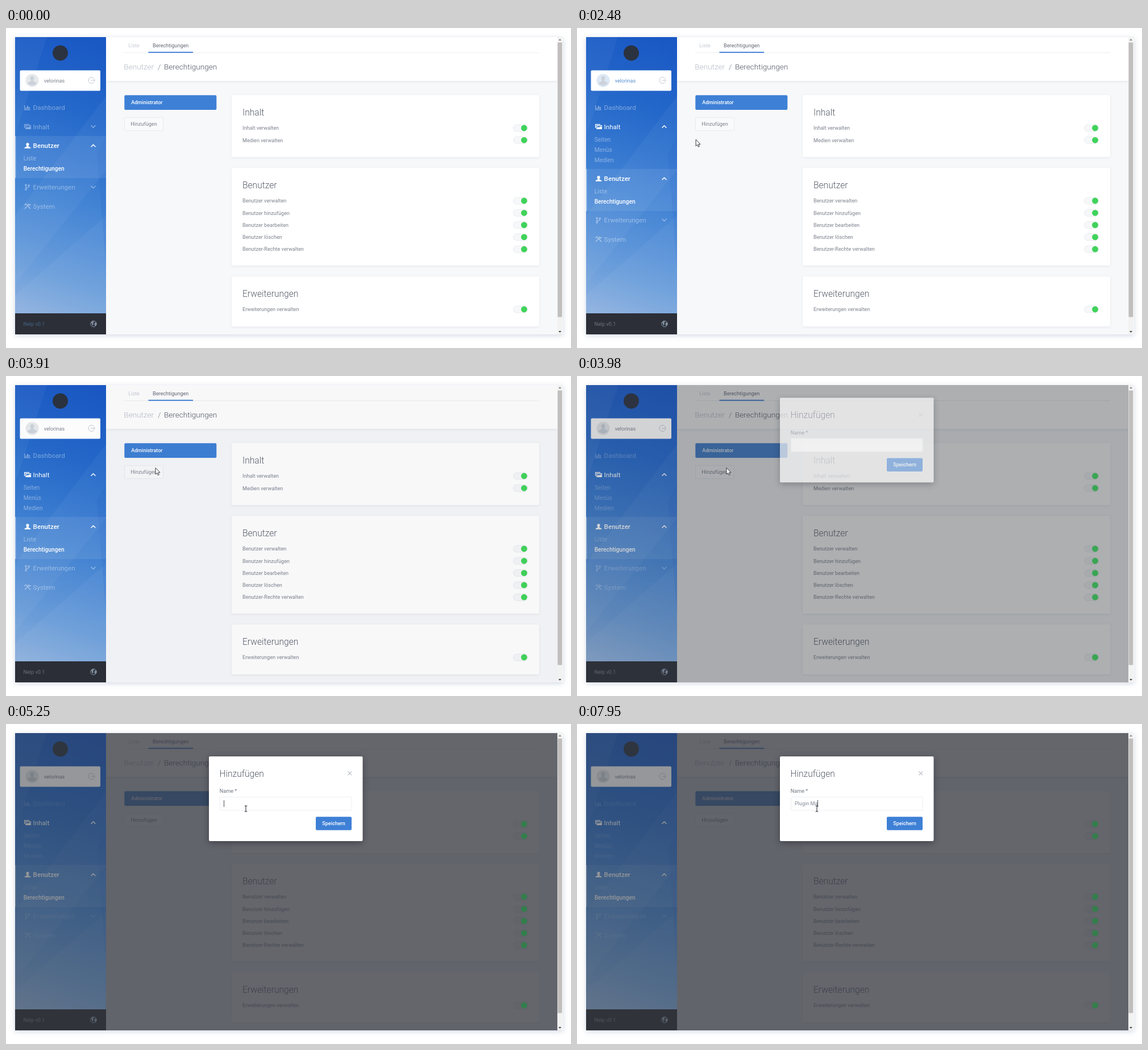
An HTML page that plays this animation: 994x563 px, repeating every 8000 ms.

```html
<!DOCTYPE html>
<html lang="de">
<head>
<meta charset="utf-8">
<title>Berechtigungen</title>
<style>
  html, body { margin: 0; width: 100%; height: 100%; overflow: hidden; background: #fff; }
  svg { display: block; width: 994px; height: 563px; }
  text { font-family: Roboto, "Open Sans", sans-serif; white-space: pre; }
  .light { font-weight: 300; }
  .mid { font-weight: 500; }
  .card { fill: #fff; filter: drop-shadow(0 1px 2px rgba(40, 50, 80, .09)); }
  .line { fill: none; stroke-linecap: round; stroke-linejoin: round; }
</style>
</head>
<body>
<svg id="stage" viewBox="0 0 994 563" xmlns="http://www.w3.org/2000/svg"></svg>
<script>
const LOOP = 8000;
const BLUE = '#3e80d6', GREY = '#7c828d', HEAD = '#565c69';
const stage = document.getElementById('stage');

// Text placed by its left edge and the middle of its capitals
const text = (x, cy, s, size, fill, extra = '') =>
  `<text x="${x}" y="${(cy + size * .355).toFixed(2)}" font-size="${size}" fill="${fill}" ${extra}>${s}</text>`;
const rect = (x, y, w, h, fill, extra = '') =>
  `<rect x="${x}" y="${y}" width="${w}" height="${h}" fill="${fill}" ${extra}/>`;
const light = 'class="light"', mid = 'class="mid"', muted = 'class="muted"';

const icons = {
  chart: '<path d="M0-4v8.5h11v-1.3H1.3V-4zM2.3 0h2v2.5h-2zM5-3h2v5.500H5zM7.800-1h2v3.500h-2z"/>',
  images: '<path fill-rule="evenodd" d="M0-4.500h9v1.300H1.300V2.500H0zM2.300-2.500H12V4.500H2.300zM3.500-1.300V2.500L5.500.300 7 1.800 9-.700 10.800 1.500V-1.300z"/>',
  person: '<path d="M6-5c-3.400 0-3 4.500-1.300 5.700C4.700 2 .500 2 .300 4.800H11.700C11.500 2 7.300 2 7.300.700 9-.500 9.400-5 6-5z"/>',
  branch: '<g class="line" stroke="#fff" stroke-width="1.300"><path d="M3-2.500V3M3 1.500C7.500 1 8.200 0 8.200-1.500"/><circle cx="3" cy="-3.500" r="1.200"/><circle cx="3" cy="4" r="1.200"/><circle cx="8.200" cy="-2.800" r="1.200"/></g>',
  tools: '<g class="line" stroke="#fff" stroke-width="1.700"><path d="M1.500 4L8-3M1-2.500L3.200-4.200 5-2.200 10.500 4M7.500-3.800l1.500 2 2-1"/></g>'
};
const item = (id, icon, label, cy, arrow, on) => `
  <g id="${id}" ${on ? '' : muted} fill="#fff">
    <g transform="translate(32 ${cy})">${icons[icon]}</g>
    ${text(47.6, cy, label, 11.6, '#fff', on ? mid : '')}
    ${arrow ? `<path ${arrow === 'id' ? 'id="chevron"' : ''} class="line" stroke="#fff" stroke-width="1.500"
      d="${arrow === 'up' ? `M150 ${cy + 1.7}l3.500-3.500 3.500 3.500` : `M150 ${cy - 1.7}l3.500 3.500 3.500-3.500`}"/>` : ''}
  </g>`;

const toggle = y => `
  ${rect(892.5, y - 6, 25, 12, '#f6f7f9', 'rx="6" stroke="#e6e9ed" stroke-width=".800"')}`;
const knob = y => `<circle cx="911.500" cy="${y}" r="5.400"/>`;

const panels = [
  { y: 118, h: 109, title: 'Inhalt', rows: ['Inhalt verwalten', 'Medien verwalten'] },
  { y: 246, h: 172, title: 'Benutzer', rows: ['Benutzer verwalten', 'Benutzer hinzufügen',
    'Benutzer bearbeiten', 'Benutzer löschen', 'Benutzer-Rechte verwalten'] },
  { y: 437, h: 88, title: 'Erweiterungen', rows: ['Erweiterungen verwalten'] }
];
const rowY = (p, i) => p.y + 58 + i * 21.3;
const panel = p => `
  ${rect(397, p.y, 541, p.h, '#fff', 'class="card" rx="2"')}
  ${text(416, p.y + 30.5, p.title, 15.6, HEAD, light)}
  ${p.rows.map((r, i) => text(416, rowY(p, i), r, 9.1, GREY) + toggle(rowY(p, i))).join('')}`;
const knobs = panels.flatMap(p => p.rows.map((r, i) => knob(rowY(p, i)))).join('');

const sidebar = `
  ${rect(16, 16, 160, 486, 'url(#sky)')}
  <g clip-path="url(#side)" fill="#fff">
    <path d="M16 16H72L16 190z" opacity=".040"/>
    <path d="M16 330L176 120V250L16 450z" opacity=".040"/>
    <path d="M16 470L176 330V502H16z" opacity=".040"/>
    <path d="M176 190V420L160 220z" fill="#1a57b8" opacity=".120"/>
  </g>
  <circle cx="95.500" cy="44" r="13.500" fill="#2b3240"/>
  ${rect(24.5, 74.5, 141.5, 36, '#fff', 'rx="2"')}
  <circle id="avatar" cx="46" cy="92.300" r="11.600"/>
  <path fill="#cbd2da" d="M46 84.500c-4.500 0-4 6-1.800 7.800 0 2.200-5.200 2-6.400 5.200a11.600 11.600 0 0 0 16.400 0c-1.200-3.200-6.400-3-6.400-5.200 2.200-1.800 2.700-7.800-1.800-7.800z"/>
  ${text(66.7, 92.3, 'velorinas', 9.1, GREY, 'id="user"')}
  <path class="line" stroke="#c4c8d0" stroke-width="1" d="M155 88.800a5.500 5.500 0 1 0 0 6.400M149.500 92h7M154.700 90.200l1.800 1.800-1.800 1.800"/>
  ${item('dash', 'chart', 'Dashboard', 140, '')}
  ${item('content', 'images', 'Inhalt', 173.5, 'id')}
  <g clip-path="url(#fold)">
    ${['Seiten', 'Menüs', 'Medien'].map((s, i) => text(30.7, 196 + i * 18, s, 10.3, '#fff', muted)).join('')}
  </g>
  <g id="lower">
    ${rect(16, 190, 160, 74, '#fff', 'opacity=".080"')}
    ${rect(16, 190, 1.4, 74, '#fff', 'opacity=".450"')}
    ${item('users', 'person', 'Benutzer', 207, 'up', true)}
    ${text(30.7, 229.5, 'Liste', 10.3, '#fff', muted)}
    ${text(30.7, 247.5, 'Berechtigungen', 10.2, '#fff', mid)}
    ${item('ext', 'branch', 'Erweiterungen', 280, 'down')}
    ${item('sys', 'tools', 'System', 313.5, '')}
  </g>
  ${rect(16, 502, 160, 37, '#2c2f37')}
  ${text(30.5, 520.5, 'Nelp v0.1', 9.1, '#6b727e', 'id="version"')}
  <g transform="translate(154 520.500)"><circle r="5.300" class="line" stroke="#8290a2"/>
    <path fill="#8290a2" d="M-4.500-2.500L-1-5 1-3.500-1-1 0 1-2 3.500-3 0zM2-2l3-.500V2L2.500 4 1.500 1z"/></g>`;

const content = `
  ${rect(176, 16, 794, 523, '#f7f8fa')}
  ${rect(176, 16, 794, 77, '#fff', 'style="filter:drop-shadow(0 1px 2px rgba(40,50,80,.1))" clip-path="url(#top)"')}
  ${rect(208, 43, 730, 1, '#eceef1')}
  ${rect(250.5, 41.8, 78.5, 2, '#4483d8')}
  ${text(215.3, 30.5, 'Liste', 9.1, '#c6cbd3')}
  ${text(258, 30.5, 'Berechtigungen', 9.1, '#626875')}
  ${text(207.3, 68.5, 'Benutzer', 13.6, '#b4bac4', light)}
  ${text(267, 68.5, '/', 13.6, '#7d8490', light)}
  ${text(278, 68.5, 'Berechtigungen', 13.6, '#4f5562', light)}
  ${rect(208.3, 118.3, 162, 25.700, BLUE, 'rx="2"')}
  ${text(220.2, 131, 'Administrator', 9, '#fff', mid)}
  ${rect(208.5, 157.5, 68, 23, '#f9fafb', 'rx="2" stroke="#e8eaee"')}
  ${text(219.3, 169, 'Hinzufügen', 9.1, GREY)}
  ${panels.map(panel).join('')}`;

const modal = `
  <g id="modal">
    ${rect(357, 57, 270.5, 149, '#fff', 'id="sheet" rx="2" style="filter:drop-shadow(0 3px 6px rgba(10,12,20,.4))"')}
    <g id="form">
      ${text(375.5, 87.5, 'Hinzufügen', 15.6, HEAD, light)}
      <path class="line" stroke="#c3c8cf" stroke-width="1.300" d="M601.700 83.700l6 6m0-6l-6 6"/>
      ${text(375.8, 118, 'Name *', 9.1, '#6d737f')}
      ${rect(376.5, 128.5, 231.5, 23.5, '#fff', 'rx="1" stroke="#eceef1"')}
      ${text(383, 140, '', 9.1, '#858b96', 'id="typed"')}
      ${rect(383, 134, 1, 12, '#4a4f5a', 'id="caret"')}
      ${rect(545, 163.3, 63, 23.4, BLUE, 'rx="2"')}
      ${text(556.3, 175, 'Speichern', 9, '#fff', mid)}
    </g>
  </g>`;

stage.innerHTML = `
  <defs>
    <linearGradient id="sky" gradientUnits="userSpaceOnUse" x1="176" y1="30" x2="10" y2="505">
      <stop offset="0" stop-color="#1a58c4"/><stop offset=".250" stop-color="#2468ca"/>
      <stop offset=".550" stop-color="#4384d4"/><stop offset=".820" stop-color="#6b9edb"/>
      <stop offset="1" stop-color="#92b4e0"/>
    </linearGradient>
    <clipPath id="side"><rect x="16" y="16" width="160" height="486"/></clipPath>
    <clipPath id="top"><rect x="176" y="16" width="794" height="84"/></clipPath>
    <clipPath id="fold"><rect id="foldBox" x="16" y="188" width="160" height="0"/></clipPath>
  </defs>
  ${rect(16, 16, 964, 523, '#fff', 'style="filter:drop-shadow(0 2px 5px rgba(50,80,130,.22))"')}
  ${content}${sidebar}
  ${rect(970, 16, 9.5, 523, '#f2f2f2')}${rect(970.5, 25.5, 7.8, 483, '#c1bebe')}
  <path fill="#858585" d="M972 22l2.500-3 2.500 3z"/><path fill="#444" d="M972 533l2.500 3 2.500-3z"/>
  ${rect(176, 16, 794, 523, '#34373e', 'id="dimMain"')}
  ${rect(16, 16, 160, 523, '#34383f', 'id="dimSide"')}
  <g id="knobs">${knobs}</g>
  ${modal}
  <path id="arrow" d="M0 0V11.500L2.700 9.100 4.400 13 6.200 12.200 4.500 8.400H8z" fill="#fff" stroke="#22252c" stroke-width=".900"/>
  <path id="beam" class="line" stroke="#33363d" stroke-width="1.100" d="M-2-5h1.500L0-4.500.500-5H2M0-4.500v9M-2 5h1.500L0 4.500.500 5H2"/>`;

const $ = id => document.getElementById(id);
const set = (el, o) => { for (const k in o) el.setAttribute(k, o[k]); };
const show = (el, on) => el.setAttribute('visibility', on ? 'visible' : 'hidden');
const mutedEls = [...stage.querySelectorAll('.muted')].filter(el => el.id !== 'content');

// [start, last step, number of steps]
const bursts = [[530, 1300, 11], [1380, 1860, 7], [2100, 2650, 8], [2950, 3180, 4], [3350, 3740, 6], [3910, 4460, 8]];
// [time, x, y]
const path = [[530, 668, 480], [760, 480, 385], [1000, 290, 240], [1300, 173, 202], [1380, 170, 196], [1860, 130, 172],
  [2100, 130, 172], [2480, 207.5, 195.5], [2650, 228, 205], [2880, 228, 205], [3180, 262, 155],
  [3300, 262, 155], [3740, 263, 161.5], [4085, 263, 161.5], [4460, 422, 149]];
// [time, main shade, side shade, sheet opacity, form opacity, modal shift]
const fades = [[0, 0, 0, 0, 0, 0], [3910, .03, .01, 0, 0, -30], [3980, .4, .22, .66, .5, -18.7], [4070, .76, .52, 1, 1, 0]];
const typing = [[0, ''], [5780, 'P'], [5950, 'Pl'], [6250, 'Plu'], [6420, 'Plug'], [6480, 'Plugi'],
  [6640, 'Plugin'], [7190, 'Plugin\u00a0'], [7480, 'Plugin\u00a0M'], [7950, 'Plugin\u00a0Ma']];
const blinks = [[0, 0], [4070, 0], [4160, 1], [4690, 0], [5250, 1], [5700, 0], [5780, 1]];

const last = (table, t) => table.filter(r => r[0] <= t).pop();
const clamp = v => Math.max(0, Math.min(1, v));
const lerp = (a, b, p) => a + (b - a) * p;

function stepTime(t) {
  const b = last(bursts, t);
  if (!b) return 0;
  const gap = (b[1] - b[0]) / (b[2] - 1);
  return Math.min(b[1], b[0] + gap * Math.floor((t - b[0] + 15) / gap));
}

function pointer(t) {
  const i = path.findIndex(p => p[0] > t);
  if (i < 0) return path[path.length - 1].slice(1);
  if (i === 0) return path[0].slice(1);
  const a = path[i - 1], b = path[i], p = (t - a[0]) / (b[0] - a[0]);
  return [lerp(a[1], b[1], p), lerp(a[2], b[2], p)];
}

function draw(t) {
  const s = stepTime(t);

  const hover = clamp((s - 1500) / 300);
  const open = 1 - (1 - clamp((s - 2100) / 300)) ** 2;
  set($('content'), { opacity: lerp(.42, 1, hover) });
  set($('chevron'), { d: open > .3 ? 'M150 175.200l3.500-3.500 3.500 3.500' : 'M150 171.800l3.500 3.500 3.500-3.500' });
  set($('foldBox'), { height: 58 * open });
  set($('lower'), { transform: `translate(0 ${(58 * open).toFixed(2)})` });

  const tint = t >= 2100 && t < 3910;
  set($('user'), { fill: tint ? '#568fd3' : GREY });
  set($('avatar'), { fill: tint ? '#dce8f4' : '#e7e9ec' });
  set($('version'), { fill: t < 1300 ? '#456487' : '#6b727e' });

  const [, main, side, sheet, form, shift] = last(fades, t);
  set($('dimMain'), { opacity: main });
  set($('dimSide'), { opacity: side });
  const k = main / .76;
  const mix = (a, b) => Math.round(lerp(a, b, k));
  set($('knobs'), { fill: `rgb(${mix(63, 52)},${mix(211, 126)},${mix(90, 76)})` });
  mutedEls.forEach(el => el.setAttribute('opacity', lerp(.42, .17, k)));

  show($('modal'), sheet > 0);
  set($('modal'), { transform: `translate(0 ${shift})` });
  set($('sheet'), { opacity: sheet });
  set($('form'), { opacity: form });

  const typed = $('typed');
  typed.textContent = last(typing, t)[1];
  set($('caret'), {
    x: Math.floor(383 + (typed.textContent ? typed.getComputedTextLength() : 0)),
    opacity: last(blinks, t)[1]
  });

  const [x, y] = pointer(s);
  const inField = s > 4100 && x > 376;
  const at = { transform: `translate(${x.toFixed(1)} ${y.toFixed(1)})` };
  set($('arrow'), at);
  set($('beam'), at);
  show($('arrow'), t >= 530 && !inField);
  show($('beam'), inField);
}

const start = performance.now();
function tick() {
  draw((performance.now() - start) % LOOP);
  requestAnimationFrame(tick);
}
tick();
</script>
</body>
</html>
```
